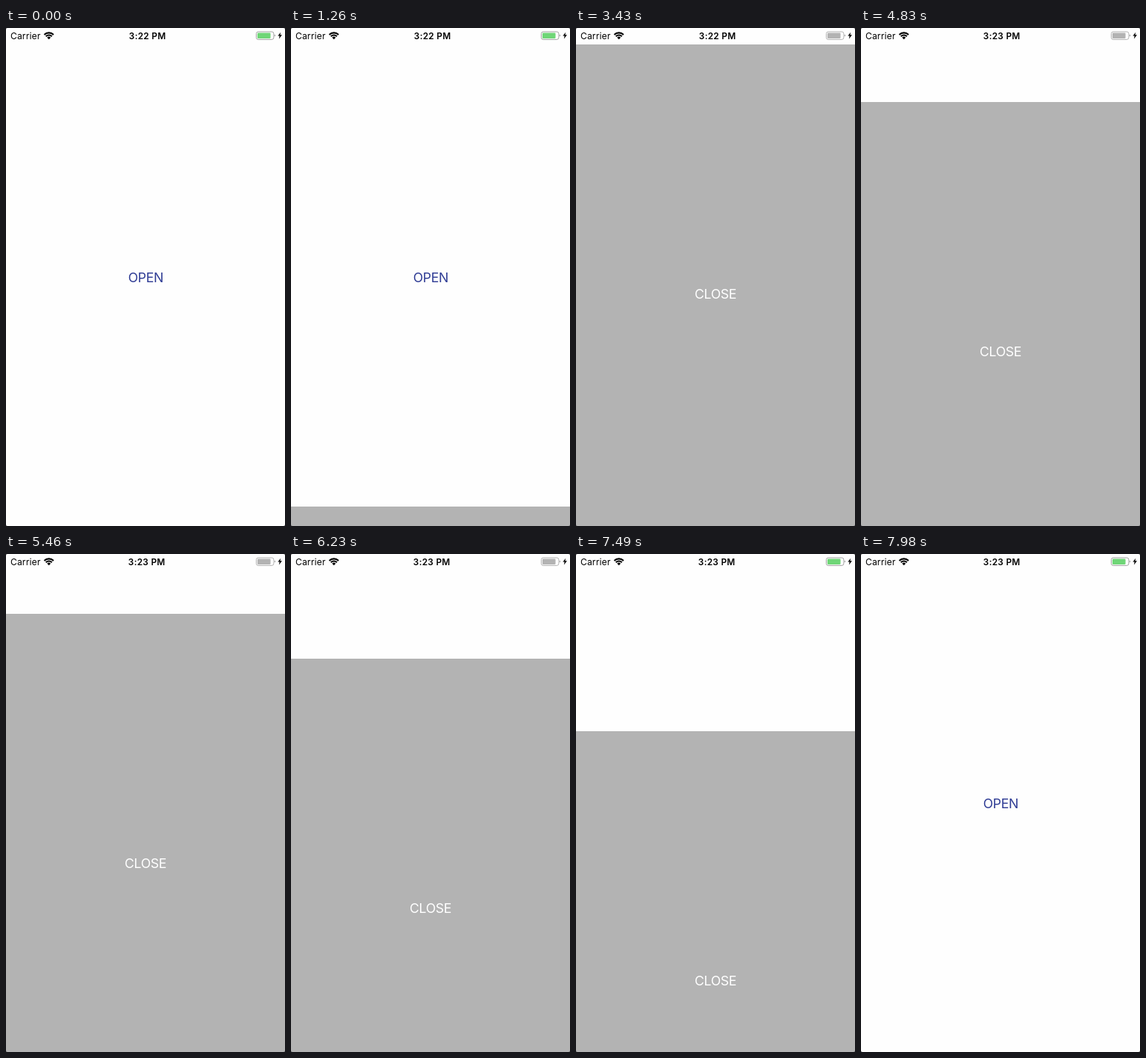
These frames come from a looping animation (374 by 666 pixels, 8680 ms). An HTML page:

```html
<!DOCTYPE html>
<html lang="en">
<head>
<meta charset="utf-8">
<title>Draggable sheet</title>
<style>
  html, body { margin: 0; width: 100%; height: 100%; overflow: hidden; background: #fefefe; }
  svg { display: block; width: 100vw; height: 100vh; }
  text { font-family: Inter, Roboto, sans-serif; text-anchor: middle; }
  .label { font-size: 17.6px; letter-spacing: -0.35px; }
</style>
</head>
<body>
<svg viewBox="0 0 374 666">
  <rect width="374" height="666" fill="#fefefe"/>
  <text class="label" x="187.3" y="340.2" fill="#303d95">OPEN</text>

  <g id="sheet">
    <rect width="374" height="668" fill="#b3b3b3"/>
    <text class="label" x="187" y="340.2" fill="#fff">CLOSE</text>
  </g>

  <g id="status">
    <text x="6" y="14.7" font-size="12" letter-spacing="0.15" style="text-anchor:start">Carrier</text>
    <g fill="none" stroke="#000" stroke-width="2.1">
      <path d="M51.3 8.9A8.8 8.8 0 0 1 63.7 8.9"/>
      <path d="M53.5 11.2A5.7 5.7 0 0 1 61.5 11.2"/>
    </g>
    <path d="M57.5 15.2L55.1 12.8A3.4 3.4 0 0 1 59.9 12.8Z"/>
    <text id="clock" y="14.7" font-size="11.8" font-weight="600" letter-spacing="0.3"></text>
    <rect id="shell" x="335.5" y="5" width="23.4" height="10.4" rx="2.6" fill="none"/>
    <rect id="charge" x="337" y="6.5" width="17.6" height="7.4" rx="1.2"/>
    <path d="M360.1 8.6Q361.7 10.1 360.1 11.6Z" fill="#444"/>
    <path d="M368.2 5.8L364.4 10.6H366.7L365.9 14.4L370 9.3H367.5Z"/>
  </g>

  <path fill="#555" d="M0 0H2Q0 0 0 2ZM374 0V2Q374 0 372 0ZM0 666V664Q0 666 2 666ZM374 666H372Q374 666 374 664Z"/>
</svg>
<script>
  const LOOP = 8680, STEP = 70, HEIGHT = 666;
  const OPEN_AT = 1242.8, CLOCK_AT = 3780, GONE_AT = 7980;
  const $ = id => document.getElementById(id);
  const sheet = $('sheet'), clock = $('clock'), shell = $('shell'), charge = $('charge');

  const smooth = p => p * p * (3 - 2 * p);
  const easeOut = p => 1 - (1 - p) ** 2;
  // Critically damped spring falling from 1 to 0
  const spring = ms => {
    const x = 18 * ms / 1000;
    return (1 + x) * Math.exp(-x);
  };

  // start, end, sheet top to reach, easing
  const drags = [
    [2100, 2240, 55, smooth],
    [2590, 2730, 120, smooth],
    [3150, 3640, 0, easeOut],
    [3990, 4340, 110, smooth],
    [4760, 5110, 0, smooth],
    [5110, 5460, 80, smooth],
    [5460, 6230, 140, smooth],
    [6300, 6510, 0, smooth],
    [7140, 7560, 256, smooth],
    [7840, GONE_AT, HEIGHT, smooth]
  ];

  function sheetTop(t) {
    if (t < OPEN_AT || t >= GONE_AT) return HEIGHT;
    if (t < drags[0][0]) return HEIGHT * spring(t - OPEN_AT);
    let y = 0;
    for (const [start, end, goal, ease] of drags) {
      if (t <= start) break;
      y += (goal - y) * ease(Math.min(1, (t - start) / (end - start)));
    }
    return y;
  }

  function draw(ms) {
    const t = Math.floor(ms % LOOP / STEP) * STEP;
    const y = Math.round(sheetTop(t));
    const late = t >= CLOCK_AT;
    const muted = y < 200;
    sheet.setAttribute('transform', `translate(0 ${y})`);
    sheet.setAttribute('visibility', y < HEIGHT ? 'visible' : 'hidden');
    clock.textContent = late ? '3:23 PM' : '3:22 PM';
    clock.setAttribute('x', late ? 188.7 : 189.6);
    shell.setAttribute('stroke', muted ? '#b3b3b3' : '#a2a2a2');
    charge.setAttribute('fill', muted ? '#b3b3b3' : '#6fd677');
  }

  const begin = performance.now();
  function tick() {
    draw(performance.now() - begin);
    requestAnimationFrame(tick);
  }
  tick();
</script>
</body>
</html>
```
